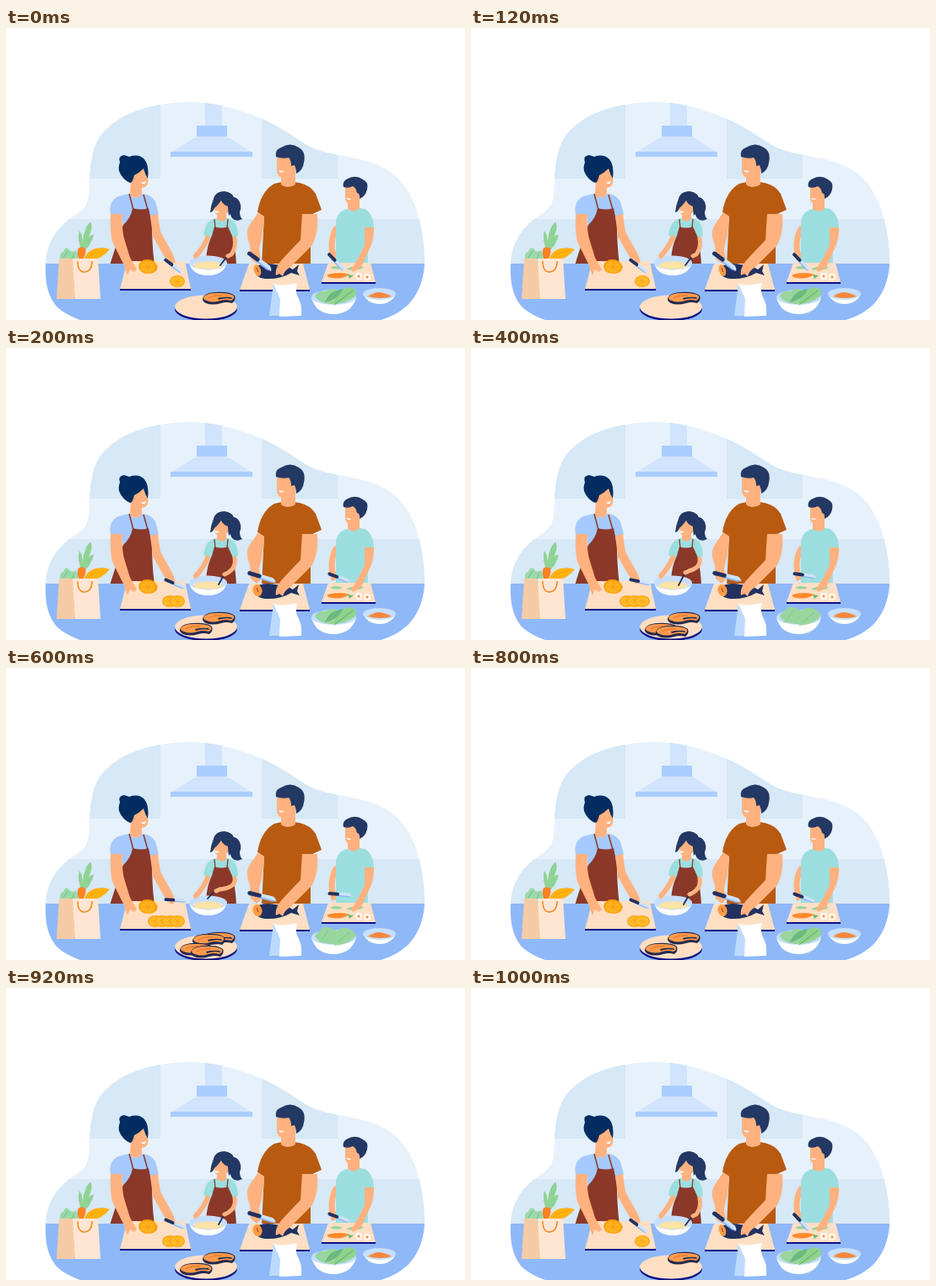
Recreate the animation shown at these times as an HTML page. Size 544 px wide and 347 px high, loop 1200 ms.

```html
<!DOCTYPE html>
<html lang="en">
<head>
<meta charset="utf-8">
<title>Family cooking</title>
<style>
html, body { margin: 0; width: 100%; height: 100%; overflow: hidden; background: #fff; }
svg { display: block; width: 100vw; height: 100vh; }
.skin { fill: #ffb27f; }
.arm { fill: none; stroke: #ffb27f; stroke-linecap: round; stroke-linejoin: round; }
.hair { fill: #243864; }
.apron { fill: #8b3828; }
.teal { fill: #9cdedf; }
.board { fill: #ffdfc4; }
.navy { fill: #0b0f85; }
.rim { fill: #c6deff; }
</style>
</head>
<body>
<svg viewBox="0 0 544 347" xmlns="http://www.w3.org/2000/svg">
  <defs>
    <clipPath id="blob">
      <path d="M47 280C48 258 58 239 78 225C91 217 97 211 98 198C100 181 98 165 104 146C115 105 169 88 219 88C259 88 305 105 338 127C352 136 359 143 382 148.500C405 153 430 156 451 168C483 187 496 232 496 280C495 304 485 322 473 332Q461 342 444 347H88Q71 341 61 332C50 320 46 304 47 280Z"/>
    </clipPath>
    <g id="knife">
      <path d="M11-2.200H24Q27-1 28 1.500L11 2.200Z" fill="#cfe2fb"/>
      <path d="M11 1L28 1.500L24 2.800L11 2.600Z" fill="#8fb8f8"/>
      <path d="M1.500 0H11" stroke="#22305f" stroke-width="4" stroke-linecap="round"/>
    </g>
    <g id="slice">
      <ellipse rx="9" ry="7" fill="#ffa412"/>
      <ellipse rx="7.600" ry="5.700" fill="#ffbe30"/>
      <path d="M-6 0H6M-4-4L4 4M4-4L-4 4M0-5V5" stroke="#ffa412" stroke-width=".8"/>
    </g>
    <g id="steak">
      <path d="M-19 1Q-18-6-4-7Q13-8 19-3Q21 2 16 6Q9 4 3 6Q-8 9-15 6Q-19 4-19 1Z" fill="#23294f"/>
      <path d="M-18-1Q-15-6-2-6Q14-6.500 18-2.500Q19 1 15 3Q8 1 2 3Q-7 6-14 3Q-18 2-18-1Z" fill="#ff9b4c"/>
      <path d="M-1 0Q7-2 15-1L16 1Q8-1 0 2Z" fill="#23294f"/>
      <path d="M-12 0Q-6-4 5-3" fill="none" stroke="#d9702f"/>
    </g>
  </defs>

  <g clip-path="url(#blob)">
    <rect width="544" height="347" fill="#e6f1fb"/>
    <path d="M40 80H183V179H40ZM303 80H393V179H303ZM40 227H500V285H40Z" fill="#d7e8f6"/>
    <path d="M236 80H256V116H236ZM226 129H262L292 148H195Z" fill="#d1e4fd"/>
    <path d="M226 116H262V129H226ZM195 147H292V153H195Z" fill="#a9cdff"/>

    <!-- mother -->
    <path d="M133 200Q146 196 158 197Q171 196 177 206L181 222L171 225L169 250H139L138 222H124Q121 206 133 200Z" fill="#a6c9ff"/>
    <path class="skin" d="M148 178H161V196Q159 203 153 201Q147 201 147 196Z"/>
    <path class="skin" d="M149 168L166 164L168 178Q170 189 161 190Q150 189 148 177Z"/>
    <path d="M135 160Q132 152 140 151L146 153Q157 149 164 156Q170 163 168 179Q165 174 163 167Q158 172 152 175Q150 184 147 184Q138 180 134 170Q133 164 135 160Z" fill="#032d60"/>
    <path d="M160 184L166 182Q165 187 160 184Z" fill="#fff"/>
    <path class="apron" d="M150 214Q160 217 169 214L173 234Q173 258 176 282H123Q131 256 139 234Q148 226 150 214Z"/>
    <path d="M151 216L146 197M168 216L163 198" stroke="#8b3828" stroke-width="1.500" fill="none"/>

    <!-- daughter -->
    <path class="teal" d="M243 228Q255 223 266 227Q274 230 275 247L269 250H240L234 246Q236 232 243 228Z"/>
    <path class="skin" d="M250 216H261V227Q256 232 250 227Z"/>
    <path class="hair" d="M264 203Q271 198 276 205Q280 211 277 219Q277 224 280 227Q273 231 268 226Q264 220 266 214Z"/>
    <path class="skin" d="M246 206H265V216Q262 223 253 223Q245 222 246 206Z"/>
    <path class="hair" d="M242 219Q243 210 246 203Q248 194 259 194Q270 195 271 206Q270 218 264 223Q263 217 263 212Q257 210 255 205Q251 211 247 214Q245 219 242 219Z"/>
    <path d="M247 217L253 218Q249 222 247 217Z" fill="#fff"/>
    <path class="apron" d="M247 236Q255 239 263 236L268 247Q272 260 273 282H237Q237 260 244 247Z"/>
    <path d="M248 238L247 227M262 238L263 227" stroke="#8b3828" stroke-width="1.300"/>

    <!-- father -->
    <path d="M318 185Q331 181 348 184Q361 187 367 197L374 216L361 222L361 282H303L306 224L298 219Q302 194 318 185Z" fill="#b95a11"/>
    <path class="skin" d="M326 169H343V186Q333 192 326 186Z"/>
    <path class="skin" d="M321 150H345V166Q341 178 330 178Q321 178 321 169Z"/>
    <path class="hair" d="M320 153Q318 145 326 142Q337 135 347 142Q356 147 353 160Q352 169 344 173Q344 167 342 163L338 164Q338 157 335 154Q328 156 320 153Z"/>
    <path d="M323 169L330 170Q326 174 323 169Z" fill="#fff"/>

    <!-- son -->
    <path class="arm" stroke-width="7" d="M391 239Q384 251 387 268"/>
    <path class="teal" d="M401 216Q413 212 425 215Q435 220 436 237L428 239L429 280H391V236Q390 221 401 216Z"/>
    <path class="skin" d="M405 201H419V215Q411 220 405 215Z"/>
    <path class="skin" d="M402 187H421V198Q417 209 408 209Q402 209 402 202Z"/>
    <path class="hair" d="M400 189Q398 182 405 179Q415 174 423 180Q430 183 428 192Q426 200 419 203Q420 197 416 196Q415 190 411 188Q406 191 400 189Z"/>
    <path d="M403 202L409 203Q406 206 403 202Z" fill="#fff"/>

    <!-- counter and boards -->
    <rect y="280" width="544" height="67" fill="#8fb8f8"/>
    <path class="navy" d="M135 309H219V312H135ZM277 310H360V313H277ZM374 301H438V304H374Z"/>
    <path class="board" d="M144 277H212L219 310H135ZM288 280H352L360 311H277ZM382 279H432L438 302H374Z"/>
    <ellipse class="navy" cx="237" cy="334" rx="37" ry="14"/>
    <ellipse class="board" cx="237" cy="331.500" rx="37" ry="14"/>

    <!-- halved orange -->
    <path d="M157 283Q159 275 167 275Q177 275 180 284Q178 292 169 292Q158 292 157 283Z" fill="#ff9f0a"/>
    <ellipse cx="168" cy="284" rx="8.500" ry="7" fill="#ffb524"/>
    <path d="M168 278V290M161 284H175M163 279L173 289M173 279L163 289" stroke="#ff9f0a"/>

    <!-- fish -->
    <path d="M294 285Q304 278 319 281Q333 282 340 287L347 281L345 289L348 294L338 291Q325 299 307 298Q295 297 294 285Z" fill="#22305f"/>
    <g id="cut"></g>

    <!-- vegetables on the small board -->
    <path d="M381 293Q396 289 407 293Q397 299 388 297Q380 297 381 293Z" fill="#ff8a2b"/>
    <path d="M405 293L412 294L407 298Z" fill="#69b975"/>
    <path d="M384 285Q390 281 399 285Q393 288 384 285ZM403 287Q412 281 424 284Q420 289 403 287Z" fill="#94d39a"/>
    <g fill="#fff"><circle cx="418" cy="295" r="4"/><circle cx="428" cy="296" r="4"/></g>
    <g fill="#ff9b45"><circle cx="418" cy="295" r="1.800"/><circle cx="428" cy="296" r="1.800"/></g>

    <!-- grocery bag -->
    <path d="M89 263Q84 249 87 241Q90 244 91 254Q92 238 100 230Q104 236 98 248Q102 245 104 246Q101 257 94 264Z" fill="#8fd394"/>
    <path d="M65 276Q62 267 68 266Q69 260 74 262Q77 268 83 264Q87 270 85 277Z" fill="#9bdaa8"/>
    <path d="M68 273L73 265M77 276L81 268" stroke="#68bd88"/>
    <path d="M85 263Q88 258 94 262Q96 269 89 278Q84 273 85 263Z" fill="#ff8122"/>
    <path d="M92 276Q96 264 106 262Q117 260 123 263Q115 273 101 277Z" fill="#ffb20e"/>
    <path d="M97 273Q104 266 117 264" fill="none" stroke="#f9a500"/>
    <path d="M63 274H86L83 322H60Z" fill="#f5cba6"/>
    <path d="M79 274H109L112 322H82Z" fill="#ffe6d3"/>
    <path d="M85 277Q85 290 93 290Q102 289 102 277" fill="none" stroke="#f18b20" stroke-width="1.500"/>

    <!-- bowls and flour -->
    <path d="M217 279H262Q258 294 239 294Q221 294 217 279Z" fill="#fff"/>
    <ellipse class="rim" cx="239.500" cy="279" rx="22.500" ry="8.500"/>
    <ellipse cx="239.500" cy="282" rx="17" ry="4.500" fill="#ffe2a5"/>
    <path d="M362 321H415Q409 340 388 340Q368 340 362 321Z" fill="#fff"/>
    <ellipse class="rim" cx="388.500" cy="320" rx="26.500" ry="9"/>
    <g id="salad"></g>
    <path d="M423 316H462Q457 328 442 328Q429 328 423 316Z" fill="#fff"/>
    <ellipse class="rim" cx="442.500" cy="316" rx="19.500" ry="7"/>
    <path d="M429 319Q436 314 443 314Q451 315 457 319Q443 323 429 319Z" fill="#f5883b"/>
    <path d="M317 304L328 306V342H312Z" fill="#bcdaff"/>
    <path d="M317 304L328 306L345 303Q342 314 347 322Q351 329 350 342L324 343L325 322Z" fill="#fff"/>

    <g id="slices"></g>
    <g id="steaks"></g>

    <!-- arms behind the knives -->
    <path class="skin" d="M124 221H138Q137 238 140 250L147 273L155 287L152 290L147 287L144 294L139 280L126 254Q123 240 124 221Z"/>
    <path class="skin" d="M171 223L180 221L183 242L198 269L201 278L196 281L189 274L174 248Z"/>
    <path class="arm" stroke-width="6" d="M239 249Q235 260 225 271"/>
    <path class="skin" d="M299 219L306 224L304 246L300 262L302 275L297 280L290 274L289 258Q283 244 288 235Z"/>
    <path class="skin" d="M383 266L391 266L391 275L386 277Z"/>
    <g id="knives"></g>

    <!-- arms in front -->
    <path class="skin" d="M351 221H369Q371 242 363 258L337 284Q330 288 328 295L324 292L320 294Q318 284 330 272L349 252Z"/>
    <path class="skin" d="M425 237H436Q437 250 431 262L421 284L412 290L409 287L417 274L425 258Z"/>
    <g id="stir"></g>
  </g>
</svg>
<script>
const step = 200;
const order = [0, 1, 2, 3, 1, 0];

const orange = [[203, 301], [194, 301], [185, 301], [177, 301]];
const salmon = [[252, 321], [225, 334], [238, 337], [240, 323]];
const stack = [[0], [0, 1], [0, 1, 2], [0, 3, 1, 2]];

// each knife: handle x, y, size and its angle in the four poses
const knives = [
  [188, 275, 0.95, [36, 22, 12, 3]],
  [287, 267, 1.25, [36, 17, 14, 14]],
  [382, 268, 1, [46, 20, 8, 4]]
];

// hand x, y and spoon tip x, y
const spoons = [
  [263, 271, 254, 282],
  [259, 269, 252, 281],
  [254, 267, 246, 282],
  [249, 265, 239, 274]
];

const leaf = '<path d="M366 318Q372 311 379 313Q386 306 394 314L405 312L414 319Q402 329 385 328Q369 326 366 318Z" fill="#98d69d"/>';
const salads = [
  leaf + '<path d="M389 329Q389 314 405 308Q418 309 414 318Q405 321 389 329Z" fill="#8ed28b"/>' +
    '<path d="M378 326Q383 312 399 310Q396 321 378 326Z" fill="#6db980"/><path d="M389 329L411 312" stroke="#5aa974"/>',
  leaf + '<path d="M371 326Q368 313 376 308Q386 306 389 316L387 327ZM389 330Q388 313 397 309Q408 307 415 317Q409 328 389 330Z" fill="#98d69d"/>' +
    '<path d="M374 324L382 311M393 326L407 314" stroke="#82c793"/>'
];

const el = id => document.getElementById(id);
const use = (id, x, y, turn = 0, size = 1) =>
  `<use href="#${id}" transform="translate(${x} ${y}) rotate(${turn}) scale(${size})"/>`;

function cutFace(p) {
  const rx = p ? 5.5 : 4;
  return `<ellipse cx="298" cy="288" rx="${rx}" ry="7" transform="rotate(-18 298 288)" fill="#ff9b45"/>` +
    '<path d="M297 285L299 290" stroke="#913d28"/>';
}

function stir(p) {
  const [x, y, tx, ty] = spoons[p];
  return `<path d="M${x + 2} ${y - 4}L${tx} ${ty}" stroke="#25315f" stroke-width="1.800" stroke-linecap="round"/>` +
    `<path class="arm" stroke-width="5" d="M271 250Q273 261 ${x + 4} ${y - 2}L${x} ${y}"/>`;
}

let shown = -1;
function draw(p) {
  if (p === shown) return;
  shown = p;
  el('slices').innerHTML = orange.slice(0, p + 1).reverse().map(([x, y]) => use('slice', x, y)).join('');
  el('steaks').innerHTML = stack[p].map(i => use('steak', ...salmon[i])).join('');
  el('knives').innerHTML = knives.map(([x, y, size, turns]) => use('knife', x, y, turns[p], size)).join('');
  el('salad').innerHTML = salads[p > 1 ? 1 : 0];
  el('cut').innerHTML = cutFace(p);
  el('stir').innerHTML = stir(p);
}

const start = performance.now();
function tick() {
  const t = Math.max(0, performance.now() - start);
  draw(order[Math.floor(t / step) % order.length]);
  requestAnimationFrame(tick);
}
tick();
</script>
</body>
</html>
```
